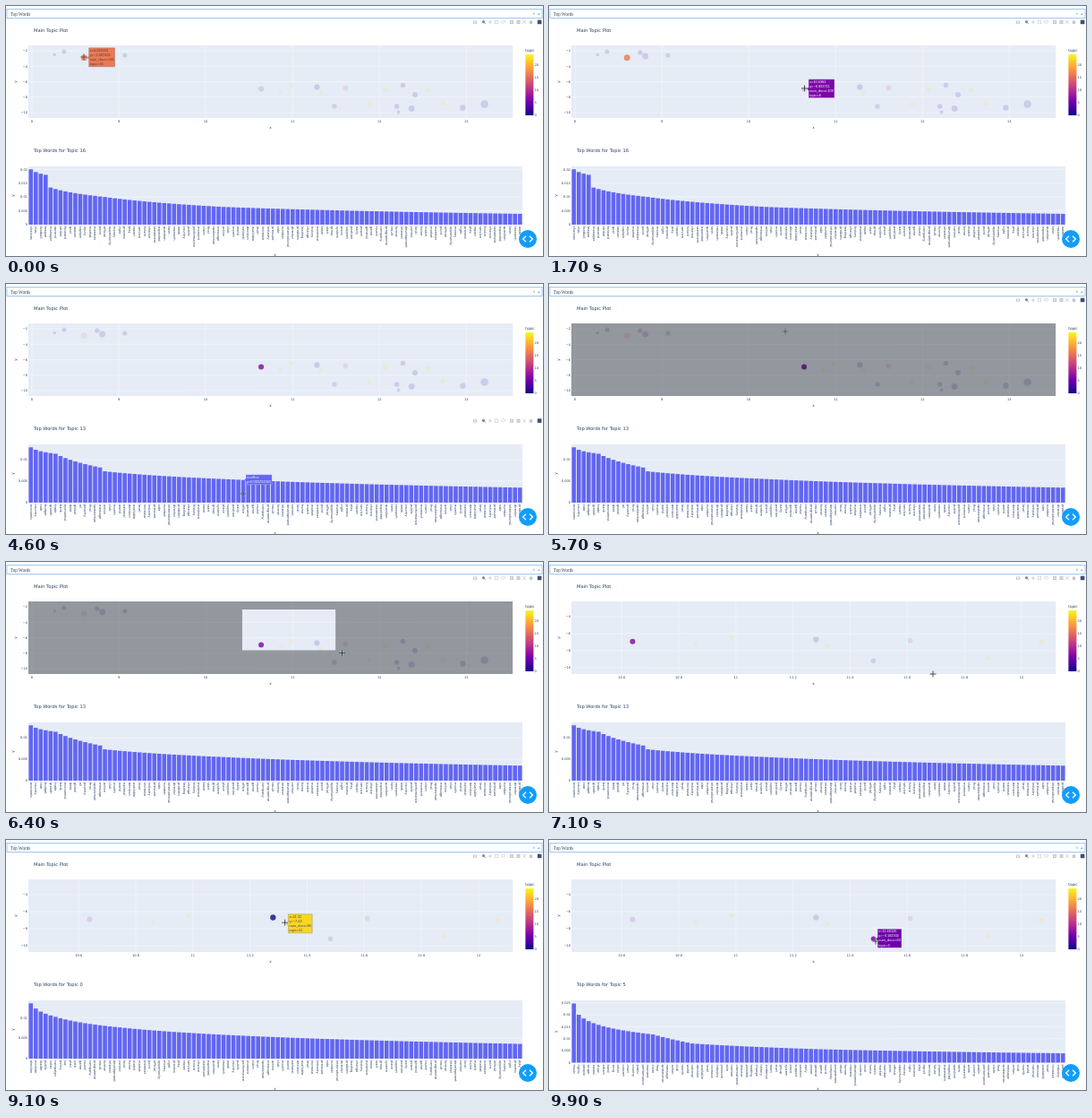
Recreate the animation shown at these times as an HTML page with a canvas. Size 600 by 279 pixels, loop 10 s.

```html
<!DOCTYPE html>
<html lang="en">
<head>
<meta charset="utf-8">
<title>Topic explorer</title>
<style>
html, body { margin: 0; width: 100%; height: 100%; overflow: hidden; background: #fff; }
canvas { display: block; width: 600px; height: 279px; }
</style>
</head>
<body>
<canvas id="stage"></canvas>
<script>
const W = 600, H = 279, LOOP = 10000, STEP = 100;
const canvas = document.getElementById('stage');
const ratio = window.devicePixelRatio || 1;
canvas.width = W * ratio;
canvas.height = H * ratio;
const ctx = canvas.getContext('2d');

const SANS = '"DejaVu Sans", Verdana, sans-serif';
const LABEL = '"Liberation Sans", Arial, sans-serif';
const SERIF = '"Liberation Serif", "Times New Roman", serif';
const INK = '#2a3f5f', PLOT = '#e5ecf6', BAR = '#6366f1';
const TITLE = 5.18, AXIS = 4.2, TICK = 3.6, HOVER = 3.9;

const PLASMA = ['#0d0887', '#46039f', '#7201a8', '#9c179e', '#bd3786', '#d8576b', '#ed7953', '#fb9f3a', '#fdca26', '#f0f921'];

function plasma(topic) {
  const p = topic / 24 * 9, i = Math.min(8, Math.floor(p));
  const part = (k, o) => parseInt(PLASMA[k].slice(o, o + 2), 16);
  return 'rgb(' + [1, 3, 5].map(o => Math.round(part(i, o) + (part(i + 1, o) - part(i, o)) * (p - i))) + ')';
}

// Bubbles as [x, y, documents], grouped by topic; the faint ones share a cool or a warm tone.
const groups = {
  16: [[8.599359, -2.887403, 134]],
  6: [[10.6383, -6.933711, 100]],
  0: [[11.28043, -6.685334, 110]],
  5: [[11.48126, -9.182932, 83]],
  13: [[11.61009, -6.813752, 92]],
  2: [
    [8.26, -2.52, 36], [8.37, -2.12, 70], [8.75, -2.23, 80], [8.81, -2.7, 134], [9.07, -2.58, 70],
    [12.27, -6.47, 80], [12.2, -9.19, 83], [12.22, -9.95, 44], [12.37, -9.48, 130], [12.41, -7.68, 105],
    [12.96, -9.37, 112], [13.21, -8.9, 205]
  ],
  22: [
    [10.86, -7.29, 50], [10.985, -6.5, 66], [11.32, -7.44, 66], [11.88, -8.87, 56],
    [12.07, -6.98, 95], [12.56, -7.1, 90], [12.73, -8.79, 75]
  ]
};
const bubbles = Object.entries(groups).flatMap(([topic, list]) =>
  list.map(([x, y, docs]) => ({ x, y, docs, topic: +topic, r: 0.3 * Math.sqrt(docs), color: plasma(topic) })));

const AREA = { l: 25, r: 566.3, t: 44, b: 125 };
const FULL = { x0: 7.9588, x1: 13.536, y0: -1.304, y1: -10.7, from: 8, to: 13, step: 1, digits: 0, top: -2 };
const ZOOM = { x0: 10.424, x1: 12.12, y0: -2.21, y1: -10.737, from: 10.6, to: 12, step: 0.2, digits: 1, top: -4 };

// Word weights: key [rank, value] points, joined along the logarithm of the rank.
const BARS = { l: 25, r: 577, t: 179, n: 100, unit: 0.005 };
const PITCH = (BARS.r - BARS.l) / BARS.n;
const topics = {
  16: {
    base: 244, keys: [[0, 0.02], [3, 0.018], [4, 0.0134], [15, 0.01], [39, 0.0064], [99, 0.0039]],
    words: 'chances club football league manager second striker forward goal season captain injury'
  },
  6: {
    base: 248.5, keys: [[0, 0.0212], [1, 0.0176], [7, 0.016], [8, 0.0133], [16, 0.0109], [30, 0.0074], [99, 0.0039]],
    words: 'police phone mobile security network site file net information attack spam user'
  },
  13: {
    base: 244, keys: [[0, 0.0129], [5, 0.0114], [14, 0.0082], [15, 0.0073], [39, 0.0055], [99, 0.0035]],
    words: 'economic country rate budget growth trade bank economist debt global oil poverty'
  },
  0: {
    base: 244, keys: [[0, 0.0135], [5, 0.0102], [19, 0.0075], [99, 0.0036]],
    words: 'election minister leader public voter campaign policy tax plan vote'
  },
  5: {
    base: 248.5, keys: [[0, 0.0247], [1, 0.02], [16, 0.0118], [24, 0.008], [50, 0.0056], [99, 0.0039]],
    words: 'music rights people singer award show album band song artist concert chart'
  }
};
const COMMON = ('team game home play week club side start round match report country month number group company ' +
  'market service public world international system programme member future performance national director ' +
  'place result point chance moment decision problem support former official statement claim available leading ' +
  'position interest opportunity expected final level change early development money question spokesman increase ' +
  'history power control right term message industry evidence general local process research action pressure').split(' ');

const mix = (a, b, u) => a + (b - a) * u;

for (const [id, t] of Object.entries(topics)) {
  const head = t.words.split(' ');
  t.scale = 0.95 * (t.base - BARS.t) / t.keys[0][1];
  t.values = Array.from({ length: BARS.n }, (_, i) => {
    const k = Math.max(1, t.keys.findIndex(p => p[0] >= i)), [a, va] = t.keys[k - 1], [b, vb] = t.keys[k];
    return mix(va, vb, Math.log((i + 1) / (a + 1)) / Math.log((b + 1) / (a + 1)));
  });
  t.words = t.values.map((_, i) => head[i] || COMMON[(i * 7 + id * 13) % COMMON.length]);
}
topics[13].words[43] = 'office';

// Pointer stops: time, x, y
const path = [
  [0, 87, 57], [600, 87, 57], [1500, 285.5, 92], [2100, 285.5, 92], [2700, 380, 87], [3300, 380, 87],
  [4600, 265, 234], [4900, 265, 234], [5500, 264, 53], [5700, 264, 53],
  [6830, 429, 125], [7200, 429, 125], [8100, 298.5, 87], [8900, 298.5, 87], [9600, 365, 113], [LOOP, 365, 113]
];

function pointer(t) {
  const k = path.findIndex(p => p[0] > t), a = path[k - 1], b = path[k];
  const u = (t - a[0]) / (b[0] - a[0]), s = u * u * (3 - 2 * u);
  return { x: mix(a[1], b[1], s), y: mix(a[2], b[2], s) };
}

// Value of the last entry that has begun
const at = (list, t) => list.filter(e => e[0] <= t).pop()[1];
const selection = [[0, 16], [1800, 6], [8200, 0], [9600, 5]];
const shown = [[0, 16], [2000, 6], [3500, 13], [8500, 0], [9800, 5]];
const DRAG = [5700, 7000];

function text(str, x, y, size, align = 'left', color = INK, family = SANS) {
  ctx.font = size + 'px ' + family;
  ctx.textAlign = align;
  ctx.fillStyle = color;
  ctx.fillText(str, x, y);
}

function turned(str, x, y, size, angle, align) {
  ctx.save();
  ctx.translate(x, y);
  ctx.rotate(angle);
  text(str, 0, 0, size, align);
  ctx.restore();
}

function rect(x, y, w, h, color) {
  ctx.fillStyle = color;
  ctx.fillRect(x, y, w, h);
}

function frame(x, y, w, h, color, width) {
  ctx.strokeStyle = color;
  ctx.lineWidth = width;
  ctx.strokeRect(x, y, w, h);
}

function disc(x, y, r, color) {
  ctx.fillStyle = color;
  ctx.beginPath();
  ctx.arc(x, y, r, 0, 7);
  ctx.fill();
}

function trace(points) {
  ctx.beginPath();
  points.forEach(([x, y], i) => i ? ctx.lineTo(x, y) : ctx.moveTo(x, y));
}

function line(points, color, width) {
  trace(points);
  ctx.strokeStyle = color;
  ctx.lineWidth = width;
  ctx.stroke();
}

function shape(points, color) {
  trace(points);
  ctx.fillStyle = color;
  ctx.fill();
}

function cross(x, y, r, color, width) {
  line([[x - r, y], [x + r, y]], color, width);
  line([[x, y - r], [x, y + r]], color, width);
}

function dropdown() {
  frame(1, 3.5, 598, 10, '#84bdf0', 0.8);
  text('Top Words', 5, 10.5, 5.1, 'left', '#444', SERIF);
  text('×', 590, 10.3, 4.5, 'center', '#999');
  shape([[593.8, 9.8], [595.3, 8], [596.8, 9.8]], '#999');
}

function modebar(y) {
  const soft = 'rgba(68,68,68,.3)', dark = 'rgba(68,68,68,.6)';
  rect(521.8, y - 1.5, 4.4, 3.2, soft);
  disc(524, y, 0.9, '#fff');
  disc(533.5, y - 0.4, 1.7, dark);
  line([[534.5, y + 0.6], [536, y + 2.2]], dark, 0.9);
  cross(541, y, 2.3, soft, 0.7);
  frame(546.2, y - 1.8, 3.6, 3.6, soft, 0.6);
  ctx.beginPath();
  ctx.ellipse(555.5, y - 0.4, 2.2, 1.5, -0.3, 0, 7);
  ctx.stroke();
  rect(563, y - 2, 4, 4, soft);
  rect(570.5, y - 2, 4, 4, soft);
  cross(565, y, 1.2, '#fff', 0.6);
  line([[571.3, y], [573.7, y]], '#fff', 0.6);
  line([[577.3, y - 2], [581, y + 2]], soft, 0.7);
  line([[577.3, y + 2], [581, y - 2]], soft, 0.7);
  shape([[584, y], [586.5, y - 2.2], [589, y]], soft);
  rect(585, y, 3, 2, soft);
  rect(593.8, y - 2.4, 4.6, 4.6, '#3f4f75');
}

function colorbar() {
  text('topic', 580.3, 51, AXIS);
  const g = ctx.createLinearGradient(0, 122, 0, 54);
  PLASMA.forEach((c, i) => g.addColorStop(i / 9, c));
  rect(580.4, 54, 9, 68, g);
  for (let v = 0; v <= 20; v += 5) text(v, 590.5, 123.3 - v * 68 / 24, TICK);
}

function tooltip(x, y, gap, rows, fill, ink) {
  ctx.font = HOVER + 'px ' + LABEL;
  const pitch = HOVER * 1.3;
  const w = Math.max(...rows.map(r => ctx.measureText(r).width)) + 2.2;
  const h = rows.length * pitch + 0.7, l = x + gap, t = y - h / 2 - 0.4;
  const outline = [[l - 1.8, y], [l, y - 1.8], [l, t], [l + w, t], [l + w, t + h], [l, t + h], [l, y + 1.8], [l - 1.8, y]];
  shape(outline, fill);
  line(outline, ink, 0.25);
  rows.forEach((r, i) => text(r, l + 1.1, t + 4 + i * pitch, HOVER, 'left', ink, LABEL));
}

function scatter(t, cursor) {
  const v = t >= DRAG[1] ? ZOOM : FULL, { l, r, t: top, b } = AREA;
  const px = x => mix(l, r, (x - v.x0) / (v.x1 - v.x0));
  const py = y => mix(top, b, (y - v.y0) / (v.y1 - v.y0));
  text('Main Topic Plot', 31, 29.3, TITLE);
  rect(l, top, r - l, b - top, PLOT);
  for (let x = v.from; x < v.to + 0.01; x += v.step) {
    line([[px(x), top], [px(x), b]], '#fff', 0.4);
    text(+x.toFixed(v.digits), px(x), 129.6, TICK, 'center');
  }
  for (let y = v.top; y >= -10; y -= 2) {
    line([[l, py(y)], [r, py(y)]], '#fff', 0.4);
    text('−' + -y, 24, py(y) + 1.4, TICK, 'right');
  }
  text('x', 295.5, 137, AXIS, 'center');
  turned('y', 11.5, 84.5, AXIS, -Math.PI / 2, 'center');

  const picked = at(selection, t);
  const dragging = t >= DRAG[0] && t < DRAG[1];
  let near = null, best = 6;
  ctx.save();
  ctx.beginPath();
  ctx.rect(l, top, r - l, b - top);
  ctx.clip();
  for (const p of bubbles) {
    const x = px(p.x), y = py(p.y), d = Math.hypot(x - cursor.x, y - cursor.y);
    ctx.globalAlpha = p.topic === picked ? 0.8 : 0.14;
    disc(x, y, p.r, p.color);
    if (d < best) { best = d; near = p; }
  }
  ctx.globalAlpha = 1;
  if (dragging) {
    const end = pointer(Math.max(DRAG[0], t - 35));
    ctx.fillStyle = 'rgba(0,0,0,.36)';
    ctx.beginPath();
    ctx.rect(l, top, r - l, b - top);
    ctx.rect(264, 53, end.x - 264, end.y - 53);
    ctx.fill('evenodd');
  }
  ctx.restore();
  colorbar();
  if (near && !dragging) {
    const rows = ['x=' + near.x, 'y=−' + -near.y, 'num_docs=' + near.docs, 'topic=' + near.topic];
    tooltip(px(near.x), py(near.y), near.r + 2, rows, near.color, near.topic >= 16 ? '#444' : '#fff');
  }
}

function barChart(t, cursor) {
  const id = at(shown, t), d = topics[id], { l, r, t: top, unit } = BARS;
  const py = value => d.base - value * d.scale;
  text('Top Words for Topic ' + id, 31, 163.4, TITLE);
  rect(l, top, r - l, d.base - top, PLOT);
  for (let v = 0; py(v) > top; v += unit) {
    line([[l, py(v)], [r, py(v)]], '#fff', 0.4);
    text(+v.toFixed(3), 24, py(v) + 1.3, TICK, 'right');
  }
  d.values.forEach((value, i) => {
    const x = l + (i + 0.5) * PITCH;
    rect(x - PITCH * 0.42, py(value), PITCH * 0.84, value * d.scale, BAR);
    turned(d.words[i], x - 1.2, d.base + 2, TICK, Math.PI / 2, 'left');
  });
  turned('y', 9, (top + d.base) / 2, AXIS, -Math.PI / 2, 'center');
  text('x', 300.5, 279.3, AXIS, 'center');
  const i = Math.floor((cursor.x - l) / PITCH), y = py(d.values[i]);
  if (cursor.y > y && cursor.y < d.base) {
    tooltip(l + (i + 0.5) * PITCH, y, 2.9, ['x=' + d.words[i], 'y=' + d.values[i].toFixed(9)], BAR, '#fff');
  }
}

function button() {
  disc(583, 260, 10, '#119dff');
  for (const side of [-1, 1]) {
    line([[583 + side * 2, 256.8], [583 + side * 5.4, 260], [583 + side * 2, 263.2]], '#fff', 1.3);
  }
}

function draw(t) {
  const cursor = pointer(t), { x, y } = cursor;
  ctx.setTransform(ratio, 0, 0, ratio, 0, 0);
  rect(0, 0, W, H, '#fff');
  dropdown();
  modebar(y > 142 ? 152.7 : 18);
  scatter(t, cursor);
  barChart(t, cursor);
  button();
  cross(x, y, 3.5, 'rgba(255,255,255,.5)', 1.6);
  cross(x, y, 3.5, '#222', 0.8);
}

const start = performance.now();
function tick(now) {
  const t = Math.max(0, now - start) % LOOP;
  draw(Math.floor(t / STEP) * STEP);
  requestAnimationFrame(tick);
}
draw(0);
requestAnimationFrame(tick);
</script>
</body>
</html>
```
